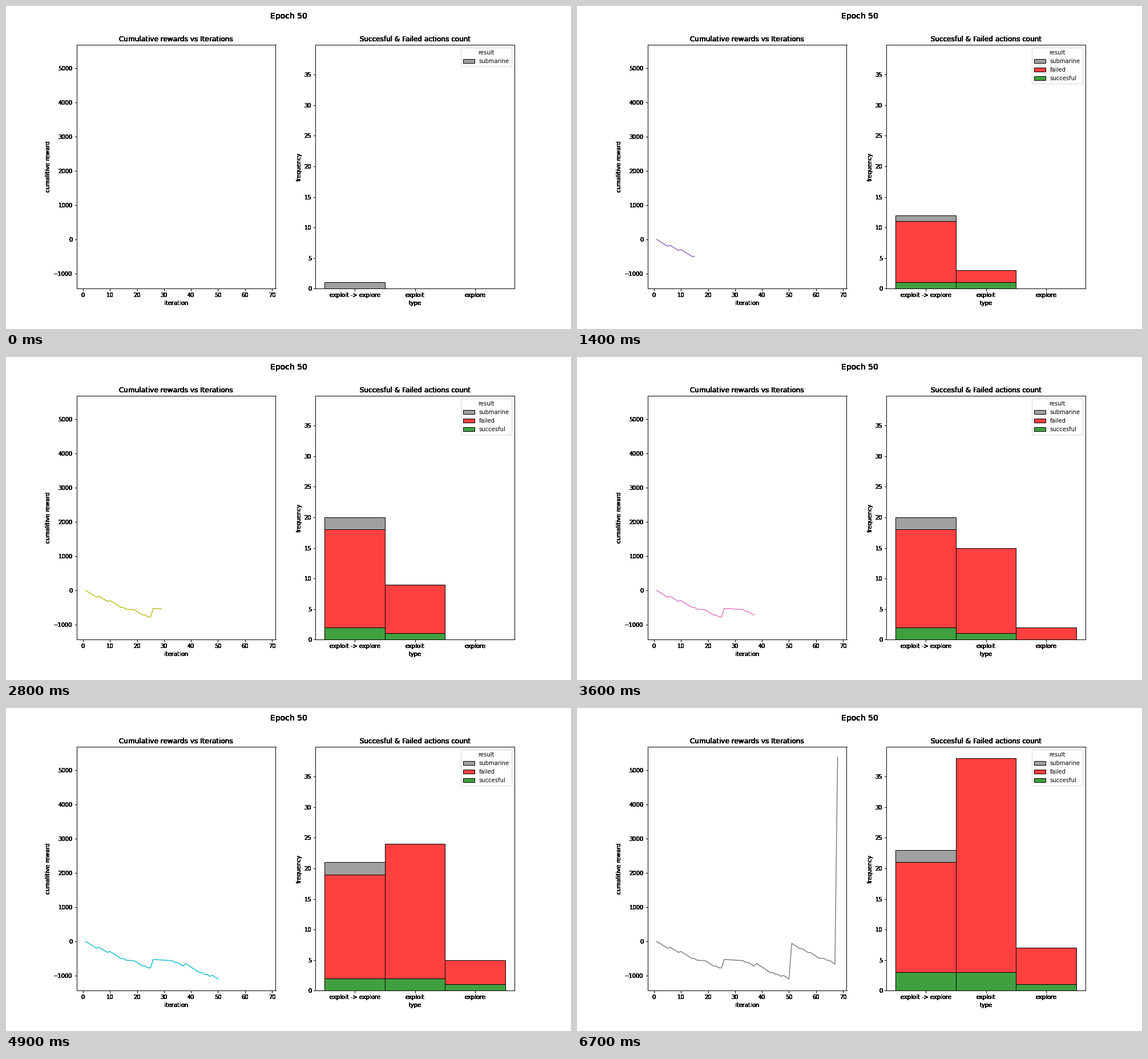
A matplotlib script for the animation above (6800 ms loop, 990 px wide and 566 px high).

```python
import numpy as np
import matplotlib.pyplot as plt
from matplotlib.animation import FuncAnimation
from matplotlib.colors import to_rgba
from matplotlib.patches import Patch

W, H, DPI = 990, 566, 72
FRAMES, INTERVAL = 68, 100
PASSES = 14  # repeated drawing turns soft glyph edges solid

plt.rcParams.update({"font.family": "DejaVu Sans", "font.size": 10})

TYPES = ["exploit -> explore", "exploit", "explore"]
RESULTS = {"submarine": "gray", "failed": "red", "succesful": "green"}

# Step of each success: (action type, reward)
HITS = {5: (0, 25), 9: (1, 25), 25: (0, 250), 37: (1, 75), 47: (2, 25),
        50: (1, 1045), 67: (0, 6045)}
SUBMARINES = (0, 24)
REPEATS = {14, 16, 17, 18, 22, 24, *range(26, 33), 34, 43, 45, 54, 57, 61,
           62, 64}
STEPS = np.arange(FRAMES)


def reward(i):
    """Successes pay, repeated shots cost little, misses ever more."""
    if i == 0:
        return 0
    if i in HITS:
        return HITS[i][1]
    return -5 if i in REPEATS else -(49 + 0.07 * i)


def count_actions():
    """Running totals, indexed by step, result and type."""
    mixed = np.floor(np.interp(STEPS, [0, 5, 8, 9, 14, 21, 25, 38, 39, 63, 67],
                               [1, 6, 7, 7, 12, 17, 20, 20, 21, 21, 23]))
    explore = np.clip((STEPS - 27) // 4, 0, 7)
    totals = np.stack([mixed, STEPS + 1 - mixed - explore, explore], axis=1)

    subs, wins = np.zeros_like(totals), np.zeros_like(totals)
    for i in SUBMARINES:
        subs[i:, 0] += 1
    for i, (kind, _) in HITS.items():
        wins[i:, kind] += 1
    return np.stack([subs, totals - subs - wins, wins], axis=1)


REWARD = np.cumsum([reward(i) for i in STEPS])
COUNTS = count_actions()


def solidify(artist):
    draw = artist.draw

    def draw_repeatedly(renderer):
        for _ in range(PASSES):
            draw(renderer)

    artist.draw = draw_repeatedly


def solidify_axes(ax):
    solidify(ax.title)
    for spine in ax.spines.values():
        solidify(spine)
    for axis in (ax.xaxis, ax.yaxis):
        solidify(axis.label)
        for tick in axis.get_major_ticks():
            solidify(tick.label1)
            solidify(tick.tick1line)


# The tiny margin keeps the height from being truncated to one pixel less
fig, (left, right) = plt.subplots(
    1, 2, figsize=(W / DPI, (H + 0.01) / DPI), dpi=DPI, facecolor="white")
fig.subplots_adjust(left=0.125, right=0.9, bottom=0.1252, top=0.88,
                    wspace=0.2)
solidify(fig.suptitle("Epoch 50", fontsize=14))

left.set(title="Cumulative rewards vs Iterations", xlabel="iteration",
         ylabel="cumalitive reward", xticks=range(0, 71, 10),
         yticks=range(-1000, 5001, 1000), xlim=(-2.35, 71.35),
         ylim=(-1436, 5689))
right.set(title="Succesful & Failed actions count", xlabel="type",
          ylabel="frequency", yticks=range(0, 36, 5), xlim=(-0.65, 2.65),
          ylim=(0, 39.9))
right.set_xticks(range(3), TYPES)
for ax in (left, right):
    solidify_axes(ax)

styles = {name: dict(facecolor=to_rgba(color, 0.75), edgecolor="black",
                     linewidth=1)
          for name, color in RESULTS.items()}
line, = left.plot([], [], lw=1.5)
bars = [right.bar(range(3), [0] * 3, width=1, **style)
        for style in styles.values()]
keys = [Patch(label=name, **style) for name, style in styles.items()]


def update(i):
    line.set_data(STEPS[:i + 1] + 1, REWARD[:i + 1])
    line.set_color(f"C{i % 10}")

    base = np.zeros(3)
    for group, heights in zip(bars[::-1], COUNTS[i][::-1]):
        for bar, y, h in zip(group, base, heights):
            bar.set(y=y, height=h, visible=h > 0)
        base += heights

    seen = [key for key, row in zip(keys, COUNTS[i]) if row.any()]
    right.legend(handles=seen, title="result", loc="upper right")
    return [line]


anim = FuncAnimation(fig, update, frames=FRAMES, interval=INTERVAL,
                     repeat=True, repeat_delay=0, blit=False)
plt.show()
```
